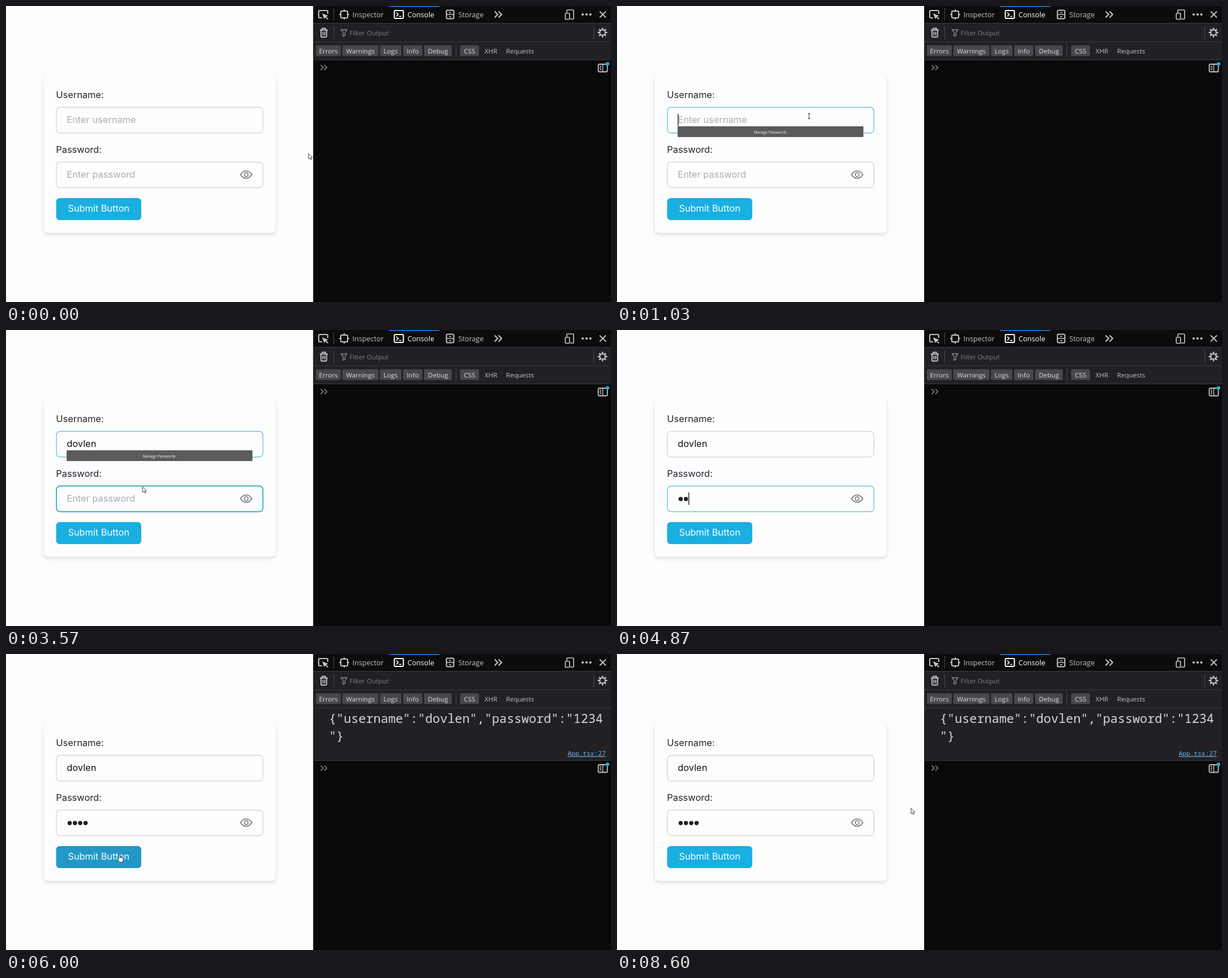
Recreate the animation shown at these times as an HTML page. Size 1068 by 524 pixels, loop 8.63 s.

```html
<!DOCTYPE html>
<html lang="en">
<head>
<meta charset="utf-8">
<title>Login form with console</title>
<style>
  html, body { margin: 0; width: 100%; height: 100%; overflow: hidden; background: #fdfdfd; }
  svg { display: block; width: 100%; height: 100%; }
  text { white-space: pre; }
  .form { font: 16.4px Inter, Roboto, sans-serif; fill: #23262f; }
  .hint { fill: #a9adb6; }
  .tools { font: 12.6px "Open Sans", "Noto Sans", sans-serif; fill: #c4c4c8; }
  .small { font-size: 11.6px; }
  .mono { font: 21.8px "Noto Sans Mono", "DejaVu Sans Mono", monospace; fill: #d9d9dc; }
  .icon { fill: none; stroke: #c4c4c6; stroke-width: 2; stroke-linejoin: round; }
  .card { filter: drop-shadow(0 3px 3px rgba(0, 0, 0, .13)); }
</style>
</head>
<body>
<svg viewBox="0 0 1068 524" preserveAspectRatio="none">
  <rect width="1068" height="524" fill="#fdfdfd"/>

  <g class="form">
    <rect class="card" x="66.5" y="122" width="409.5" height="279.5" rx="8" fill="#fdfdfd"/>
    <text x="88.3" y="163">Username:</text>
    <rect id="userBox" x="89" y="179.3" width="364.5" height="45.5" rx="6.5" fill="#fdfdfd"/>
    <text id="userHint" class="hint" x="107.3" y="207">Enter username</text>
    <text id="userText" x="107.3" y="207" fill="#111318"></text>

    <text x="88.3" y="260">Password:</text>
    <rect id="passBox" x="89" y="276.2" width="364.5" height="45.5" rx="6.5" fill="#fdfdfd"/>
    <text id="passHint" class="hint" x="107.3" y="304">Enter password</text>
    <g id="dots"></g>
    <g fill="none" stroke="#6b7280" stroke-width="1.5">
      <path d="M414 298.5Q418 292 424 292T434 298.5Q430 305 424 305T414 298.5Z"/>
      <circle cx="424" cy="298.5" r="3.4"/>
    </g>

    <rect id="button" x="88.5" y="340" width="150.3" height="39" rx="6"/>
    <text x="163.7" y="364.4" text-anchor="middle" font-size="16.3" style="fill:#fff">Submit Button</text>

    <rect id="caret" width="1.3" height="22" fill="#111318"/>
    <g id="popup">
      <rect x="107" y="213" width="328" height="19" rx="1" fill="#5b5b5b"/>
      <text class="tools" x="270.5" y="225.8" text-anchor="middle" style="font-size:6.4px;fill:#f4f4f4">Manage Passwords</text>
    </g>
  </g>

  <g class="tools">
    <rect x="542" width="526" height="524" fill="#09090a"/>
    <rect x="542" width="526" height="30" fill="#0c0c0d"/>
    <rect x="542" y="31" width="526" height="64" fill="#212125"/>
    <rect x="676" width="89" height="1.5" fill="#1683f5"/>
    <path d="M542 30.5H1068M542 63.5H1068M542 95.5H1068" stroke="#3a3a3e"/>
    <path d="M578.5 4V25M578.5 36V59M1037.5 36V59M794.5 68V91" stroke="#4b4b50"/>
    <path d="M542.5 0V524" stroke="#3a3a3e"/>

    <g class="icon">
      <path d="M558 21H554Q552 21 552 19V10Q552 8 554 8H566Q568 8 568 10V14"/>
      <path d="M558 13L569 17.5L565 18.7L569 22.5L567.6 24L563.8 20L562 23.6Z" fill="#c4c4c6" stroke="none"/>
      <rect x="591" y="9" width="12" height="12" rx="1.5"/>
      <path d="M597 6V9M597 21V24M588 15H591M603 15H606"/>
      <g stroke="#fff">
        <rect x="685.5" y="8" width="16" height="14" rx="2"/>
        <path d="M689 11.5L692.5 15L689 18.5M694 18.5H698" stroke-width="1.6"/>
      </g>
      <rect x="777.5" y="7.5" width="13" height="15" rx="2"/>
      <path d="M777 15H791M782 11.5H786M782 19H786" stroke-width="1.7"/>
      <path d="M862.5 9.5L868 15L862.5 20.5M869.5 9.5L875 15L869.5 20.5"/>
      <path d="M990 12V8Q990 7 991 7H1001Q1002 7 1002 8V22Q1002 23 1001 23H996" stroke-width="1.7"/>
      <rect x="987.3" y="13" width="7.5" height="10.5" rx="1" stroke-width="1.7"/>
      <path d="M1048 9.5L1059 20.5M1059 9.5L1048 20.5" stroke-width="1.8"/>
      <path d="M554 42.5H568M558 42V39.5H564V42M556 43V53Q556 55 558 55H564Q566 55 566 53V43M559.4 45.5V52M562.7 45.5V52" stroke-width="1.8"/>
      <path d="M591.5 42H602L598.5 46.5V52L595 53.5V46.5Z" stroke="#85858a" stroke-width="1.5"/>
      <circle cx="1053" cy="47" r="4.8"/>
      <g id="gear"></g>
    </g>
    <g fill="#c4c4c6"><circle cx="1018" cy="15" r="2.1"/><circle cx="1024.8" cy="15" r="2.1"/><circle cx="1031.6" cy="15" r="2.1"/></g>

    <text x="611.5" y="20">Inspector</text>
    <text x="708.8" y="20" style="fill:#fff">Console</text>
    <text x="798.5" y="20">Storage</text>
    <text class="small" x="606.5" y="51.5" style="fill:#808086">Filter Output</text>
    <g id="filters" class="small" text-anchor="middle"></g>

    <g id="log">
      <rect x="543" y="96" width="525" height="92" fill="#212125"/>
      <path d="M543 188.5H1068" stroke="#3a3a3e"/>
      <text id="line1" class="mono" x="570" y="122"></text>
      <text class="mono" x="570" y="153">"}</text>
      <text class="mono" x="991.5" y="180" style="font-size:11.2px;fill:#6cb4f0" text-decoration="underline">App.tsx:27</text>
    </g>

    <g id="prompt" class="icon">
      <path d="M555.5 104.5L560 109L555.5 113.5M562 104.5L566.5 109L562 113.5" stroke="#8a8a8e" stroke-width="1.6"/>
      <rect x="1045.5" y="103" width="16" height="13.5" rx="2" stroke-width="1.8"/>
      <path d="M1053.5 103V116M1048 106.5H1051M1048 109.5H1051M1048 112.5H1051" stroke-width="1.4"/>
      <circle cx="1062" cy="102.3" r="3.1" fill="#12b4e6" stroke="none"/>
    </g>
  </g>

  <g id="pointer">
    <path id="arrow" d="M0 0V9.6L2.3 7.6L4 11.2L5.6 10.4L4 7H7Z" fill="#fff" stroke="#333" stroke-width=".9"/>
    <path id="beam" d="M-2 -4.5H2M0 -4.5V4.5M-2 4.5H2" fill="none" stroke="#333"/>
    <path id="hand" d="M-2 -5Q-.8 -6.3 .2 -5V-1L5 0Q6.3 .6 6 3L5 7.5H-.5L-4 2.6Q-4 1 -2 2Z" fill="#fff" stroke="#333" stroke-width=".9"/>
  </g>
</svg>
<script>
const LOOP = 8630;
const NAME = "dovlen";
const FOCUS_USER = 900, FOCUS_PASS = 3800, SUBMIT = 5870;
const NAME_KEYS = [1500, 1720, 1930, 2160, 2370, 2600];
const PASS_KEYS = [4500, 4750, 4960, 5180];

// time, x, y of the pointer
const PATH = [
  [0, 534, 261], [100, 534, 261], [800, 339, 195], [2800, 339, 195],
  [3500, 241, 277], [3580, 241, 277.6], [3760, 238, 297], [5350, 238, 297],
  [5750, 201, 361], [6120, 201, 361], [6400, 380, 370], [6700, 513, 291],
  [7300, 521, 275], [8630, 519, 273]
];
const HIDDEN = [[1480, 2800], [4450, 5350]];

const $ = id => document.getElementById(id);
const show = (id, on) => $(id).setAttribute("visibility", on ? "visible" : "hidden");
const set = (id, attrs) => { for (const k in attrs) $(id).setAttribute(k, attrs[k]); };
const typed = (keys, t) => keys.filter(k => k <= t).length;
const inside = (p, x, y, w, h) => p.x >= x && p.x <= x + w && p.y >= y && p.y <= y + h;

function add(parent, tag, attrs, text = "") {
  const el = document.createElementNS("http://www.w3.org/2000/svg", tag);
  for (const k in attrs) el.setAttribute(k, attrs[k]);
  el.textContent = text;
  return $(parent).appendChild(el);
}

function build() {
  const buttons = [["Errors", 547, 44], ["Warnings", 593.5, 64], ["Logs", 660, 38],
    ["Info", 701, 34], ["Debug", 738, 49], ["CSS", 801.5, 33.5]];
  for (const [label, x, w] of buttons) {
    add("filters", "rect", { x, y: 69.5, width: w, height: 19, rx: 2, fill: "#48484c" });
    add("filters", "text", { x: x + w / 2, y: 84, style: "fill:#dedee1" }, label);
  }
  add("filters", "text", { x: 856, y: 84 }, "XHR");
  add("filters", "text", { x: 907.5, y: 84 }, "Requests");
  for (let a = 0; a < 360; a += 45)
    add("gear", "path", { d: "M1053 42V38.6", "stroke-width": 2.6, transform: `rotate(${a} 1053 47)` });
  for (let i = 0; i < 4; i++)
    add("dots", "circle", { cx: 112.4 + 9.35 * i, cy: 299.3, r: 3.7, fill: "#1d1f26" });
  $("line1").textContent = `{"username":"${NAME}","password":"1234`;
}

function pointerAt(t) {
  const i = Math.max(1, PATH.findIndex(p => p[0] > t));
  const [t0, x0, y0] = PATH[i - 1], [t1, x1, y1] = PATH[i];
  const u = (t - t0) / (t1 - t0), e = u * u * (3 - 2 * u);
  return { x: x0 + (x1 - x0) * e, y: y0 + (y1 - y0) * e };
}

function border(id, focused, hovered) {
  set(id, {
    stroke: focused ? "#55b9dc" : hovered ? "#27a3cc" : "#cfd1d8",
    "stroke-width": hovered && !focused ? 1.7 : 1.2
  });
}

function drawPointer(p, onButton) {
  const hidden = (t => HIDDEN.some(([a, b]) => t >= a && t < b))(p.t);
  const onText = inside(p, 107, 188, 328, 28) || inside(p, 107, 285, 300, 28);
  const kind = onButton ? "hand" : onText ? "beam" : "arrow";
  for (const id of ["arrow", "beam", "hand"]) show(id, !hidden && id === kind);
  set("pointer", { transform: `translate(${p.x} ${p.y})` });
}

function render(t) {
  const p = { ...pointerAt(t), t };
  const userOn = t >= FOCUS_USER && t < FOCUS_PASS;
  const passOn = t >= FOCUS_PASS && t < SUBMIT;
  const nameLen = typed(NAME_KEYS, t), passLen = typed(PASS_KEYS, t);
  const onButton = inside(p, 88.5, 340, 150, 39);
  const sent = t >= SUBMIT;

  border("userBox", userOn, inside(p, 89, 179, 365, 46));
  border("passBox", passOn, inside(p, 89, 276, 365, 46));
  $("userText").textContent = NAME.slice(0, nameLen);
  show("userHint", !nameLen);
  show("passHint", !passLen);
  [...$("dots").children].forEach((d, i) => d.setAttribute("visibility", i < passLen ? "visible" : "hidden"));
  show("popup", userOn);
  set("button", { fill: onButton ? "#2398c8" : "#1aaee1" });

  // the caret restarts its blink on each key
  const marks = [FOCUS_USER, ...NAME_KEYS, FOCUS_PASS, ...PASS_KEYS].filter(k => k <= t);
  const lit = (t - marks[marks.length - 1]) % 1000 < 500;
  show("caret", (userOn || passOn) && lit);
  const nameWidth = nameLen ? $("userText").getComputedTextLength() : 0;
  set("caret", userOn ? { x: 107.2 + nameWidth, y: 190.5 } : { x: 107.4 + 9.35 * passLen, y: 287.5 });

  show("log", sent);
  set("prompt", { transform: `translate(0 ${sent ? 93 : 0})` });
  drawPointer(p, onButton);
}

build();
const start = performance.now();
function tick() {
  render((performance.now() - start) % LOOP);
  requestAnimationFrame(tick);
}
tick();
</script>
</body>
</html>
```
